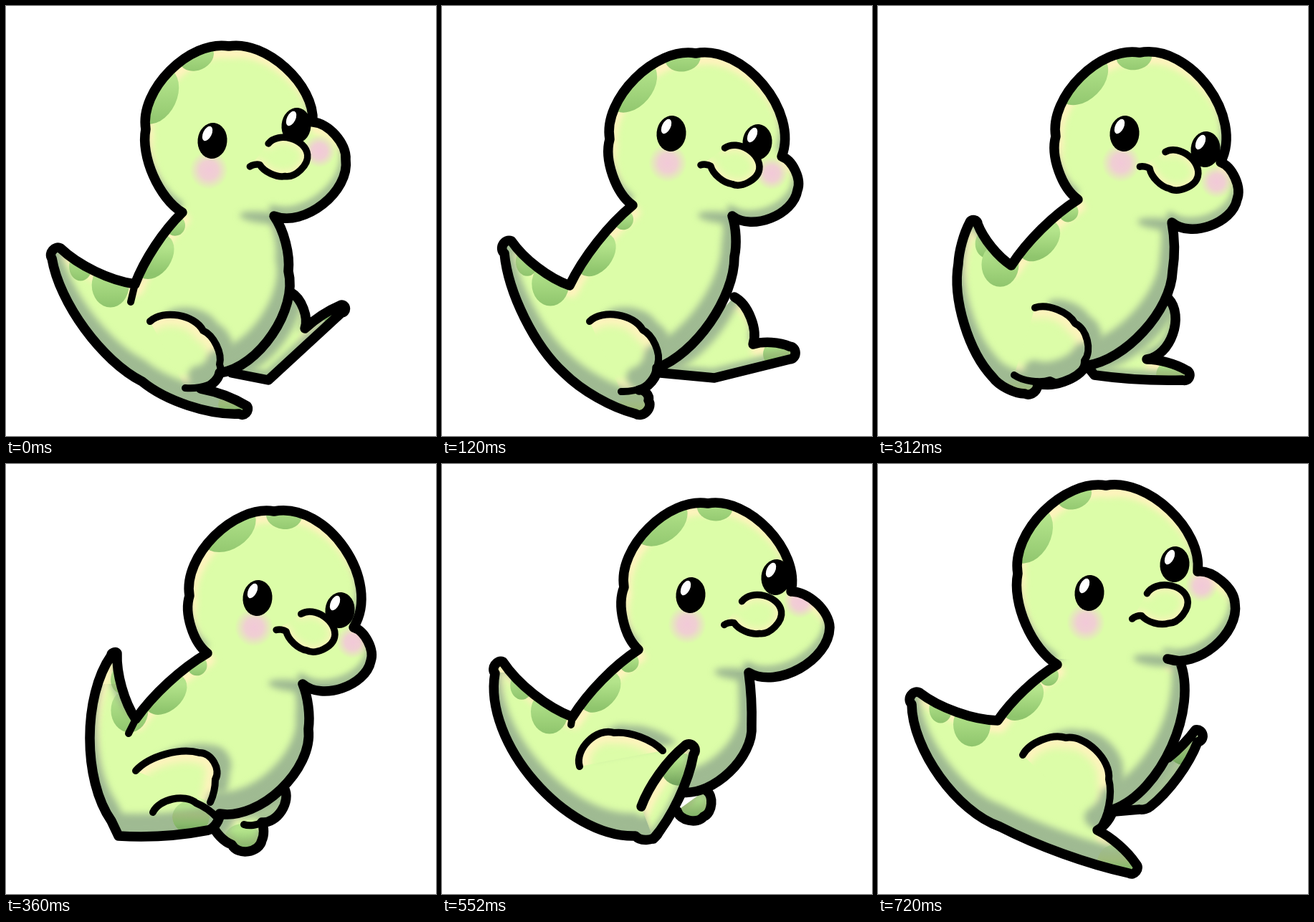
Write an HTML page with a canvas that moves like this. It is 600 px wide and 600 px high and loops after 840 ms.

```html
<!DOCTYPE html>
<html lang="en">
<head>
<meta charset="utf-8">
<title>Little dinosaur</title>
<style>
html, body { margin: 0; width: 100%; height: 100%; overflow: hidden; background: #fff; }
canvas { display: block; }
</style>
</head>
<body>
<canvas width="600" height="600"></canvas>
<script>
const HOLD = 120;
const SKIN = '#dcfda8', CREAM = '#fff3bd', SHADE = '#9fba92';
const NOSE = '-20,-24 .27 31,1 .2 -5,25 .13 -37,3 -.1 -51,3';
const ctx = document.querySelector('canvas').getContext('2d');

// Outlines run clockwise: "x,y bulge x,y ..." where a positive bulge swells outwards.
// head: centre and radius; turn: angle of the large head spot; front: throat to tail tip.
const poses = [
  {
    head: [311, 172, 116], turn: -155, nape: [246, 288], brow: [428, 162], snout: [474, 214], throat: [374, 293],
    eyes: [[288, 188], [405, 167]], nose: [390, 212], tip: [76, 338], base: [180, 388],
    front: '.08 394,370 .18 298,512 .15 272,534 .04 336,558 .4 325,569 .08 190,524 .1 64,352 .35',
    thigh: '201,440 .2 275,453 .15 298,500 .2 282,529 .05 250,533', toe: [322, 556],
    far: '398,400 .15 417,450 .04 468,417 .5 468,428 0 366,522 0 315,512', farToe: [464, 424],
    lines: ['180,388 0 174,413']
  },
  {
    head: [354, 186, 120], turn: -140, nape: [266, 278], brow: [474, 210], snout: [496, 257], throat: [405, 293],
    eyes: [[320, 178], [440, 190]], nose: [412, 224], tip: [97, 328], base: [178, 390],
    front: '.06 408,350 .13 300,505 .15 275,536 .25 288,550 .35 270,569 .06 170,512 .08 87,345 .4',
    thigh: '206,440 .2 280,452 .15 301,500 .2 282,532 .05 250,538', toe: [270, 563],
    far: '408,406 .15 434,472 .08 485,475 .45 485,493 0 380,519 0 305,512', farToe: [474, 486],
    lines: []
  },
  {
    head: [365, 182, 117], turn: -135, nape: [279, 270], brow: [478, 218], snout: [501, 270], throat: [410, 302],
    eyes: [[344, 178], [457, 200]], nose: [416, 231], tip: [139, 304], base: [186, 362],
    front: '.04 411,370 .15 290,502 .15 222,526 .3 205,541 .1 160,518 .1 112,360 .05 128,302 .4',
    thigh: '219,421 .15 275,443 .2 288,495 .25 240,522 .1 190,515', toe: [202, 538],
    far: '405,408 .25 375,493 .06 430,508 .5 425,522 .02 302,515 0 290,500', farToe: [414, 515],
    lines: []
  },
  {
    head: [374, 184, 118], turn: -124, nape: [281, 264], brow: [485, 228], snout: [509, 275], throat: [414, 307],
    eyes: [[351, 187], [466, 204]], nose: [428, 236], tip: [155, 264], base: [181, 356],
    front: '.06 422,370 .2 298,488 .15 282,511 .03 157,519 0 147,498 .13 147,267 .3',
    thigh: '181,428 .12 270,403 .25 292,440 .05 285,472', toe: [258, 493],
    far: '388,452 .25 357,500 .1 357,525 .3 315,531 .1 288,503', farToe: [330, 525],
    lines: ['181,356 0 171,376', '205,486 .2 265,473 .05 294,493', '357,500 .1 332,503']
  },
  {
    head: [371, 172, 117], turn: -126, nape: [274, 259], brow: [487, 178], snout: [541, 228], throat: [428, 291],
    eyes: [[347, 183], [466, 158]], nose: [443, 211], tip: [85, 276], base: [182, 353],
    front: '.02 432,365 .19 335,458 0 300,518 .2 270,519 .19 74,292 .35',
    thigh: '192,422 .25 240,375 .1 308,400',
    far: '368,455 .25 365,492 .25 328,484', farToe: [350, 478],
    foot: '278,478 .06 338,394 .5 351,405 .06 295,523', footToe: [332, 426],
    lines: ['182,353 0 180,364']
  },
  {
    head: [330, 160, 117], turn: -138, nape: [257, 277], brow: [446, 148], snout: [501, 207], throat: [411, 280],
    eyes: [[295, 180], [413, 140]], nose: [395, 196], tip: [68, 292], base: [180, 355],
    front: '.13 385,437 0 402,443 .3 400,482 .03 250,530 0 215,514 .17 57,305 .35',
    thigh: '197,422 .2 262,377 .16 346,445', toe: [384, 466],
    lines: ['330,461 .15 385,438']
  },
  {
    head: [318, 153, 123], turn: -153, nape: [250, 280], brow: [446, 150], snout: [498, 194], throat: [404, 272],
    eyes: [[295, 180], [414, 140]], nose: [402, 197], tip: [58, 319], base: [167, 358],
    front: '0 421,275 .17 328,482 .1 306,511 .06 360,558 .4 350,571 .03 170,506 .13 47,335 .4',
    thigh: '202,406 .15 262,382 .2 322,440 .1 308,510', toe: [332, 554],
    far: '405,410 -.03 443,371 .5 446,388 .06 380,478 .1 365,482 0 330,485', farToe: [430, 398],
    lines: []
  }
];

const rad = degrees => degrees * Math.PI / 180;
const mix = (a, b, t, drop = 0) => [a[0] + (b[0] - a[0]) * t, a[1] + (b[1] - a[1]) * t + drop];
const polar = (x, y, r, angle) => [x + r * Math.cos(angle), y + r * Math.sin(angle)];
const heading = (a, b) => Math.atan2(b[1] - a[1], b[0] - a[0]);

function curve(text) {
  const path = new Path2D();
  const tokens = text.trim().split(/\s+/);
  let [x, y] = tokens[0].split(',').map(Number);
  path.moveTo(x, y);
  for (let i = 1; i < tokens.length; i += 2) {
    const bulge = +tokens[i], [X, Y] = tokens[i + 1].split(',').map(Number);
    const dx = X - x, dy = Y - y;
    const along = (1 - 2 * Math.abs(bulge)) / 3, out = bulge * 4 / 3;
    path.bezierCurveTo(
      x + dx * along + dy * out, y + dy * along - dx * out,
      X - dx * along + dy * out, Y - dy * along - dx * out, X, Y);
    [x, y] = [X, Y];
  }
  return path;
}

function bodyCurve({ head: [x, y, r], nape, brow, snout, throat, front, tip, base }) {
  const forehead = Math.tan((Math.PI / 2 + heading([x, y], brow)) / 4) / 2;
  return curve(`${nape} .13 ${x - r},${y} .207 ${x},${y - r} ${forehead} ${brow}
    .17 ${snout} .23 ${throat} ${front} ${tip} -.07 ${base} .05 ${nape}`);
}

function scoped(draw) {
  ctx.save();
  draw();
  ctx.restore();
}

function oval([x, y], rx, ry, angle, fill) {
  ctx.fillStyle = fill;
  ctx.beginPath();
  ctx.ellipse(x, y, rx, ry, angle, 0, 2 * Math.PI);
  ctx.fill();
}

function ink(path, width) {
  ctx.strokeStyle = '#000';
  ctx.lineWidth = width;
  ctx.lineCap = ctx.lineJoin = 'round';
  ctx.stroke(path);
}

// Soft band inside the edges of a shape, moved by (dx, dy).
function rim(path, dx, dy, width, color) {
  const outside = new Path2D();
  outside.rect(-300, -300, 1200, 1200);
  outside.addPath(path);
  scoped(() => {
    ctx.filter = 'blur(5px)';
    ctx.translate(dx, dy);
    ctx.fillStyle = ctx.strokeStyle = color;
    ctx.lineWidth = width;
    ctx.fill(outside, 'evenodd');
    ctx.stroke(path);
  });
}

function castShadow(path, dx, dy) {
  scoped(() => {
    ctx.filter = 'blur(5px)';
    ctx.translate(dx, dy);
    ctx.fillStyle = SHADE;
    ctx.fill(path);
  });
}

function fold(path, glow) {
  scoped(() => {
    ctx.clip(path);
    ctx.fillStyle = SKIN;
    ctx.fill(path);
    ctx.filter = 'blur(6px)';
    ctx.strokeStyle = CREAM;
    ctx.lineWidth = glow;
    ctx.stroke(path);
  });
}

function spot([x, y], rx, ry, angle = 0, dark = '#8fc56d') {
  const fill = ctx.createLinearGradient(x, y - ry, x, y + ry);
  fill.addColorStop(0.2, '#b4e48b');
  fill.addColorStop(1, dark);
  oval([x, y], rx, ry, angle, fill);
}

function toeSpot(at) {
  if (at) spot(at, 26, 23, 0, '#6fa05a');
}

function bodySpots({ head: [x, y, r], turn, nape, tip, base }) {
  const side = rad(turn), crown = rad(turn + 41), back = heading(base, nape);
  spot(polar(x, y, r - 4, side), 29, 42, side);
  spot(polar(x, y, r - 5, crown), 19, 25, crown);
  spot(mix(base, nape, 0.42, 4), 34, 23, back);
  spot(mix(base, nape, 0.86, 5), 14, 13, back);
  spot(mix(tip, base, 0.27, 12), 16, 20);
  spot(mix(tip, base, 0.67, 18), 26, 31);
}

function cheek([x, y], radius) {
  const fill = ctx.createRadialGradient(x, y, 0, x, y, radius);
  fill.addColorStop(0, '#f2c9d8');
  fill.addColorStop(0.45, '#f2c9d8e0');
  fill.addColorStop(1, '#f2c9d800');
  oval([x, y], radius, radius, 0, fill);
}

function part(path, detail, shadeAll) {
  scoped(() => {
    ctx.clip(path);
    ctx.fillStyle = SKIN;
    ctx.fill(path);
    rim(path, 4, 10, 14, CREAM);
    detail();
    ctx.globalCompositeOperation = 'darken';
    shadeAll();
  });
  ink(path, 13.5);
}

function drawFace({ eyes: [left, right], nose }) {
  const tilt = heading(left, right);
  for (const [x, y] of [left, right]) {
    oval([x, y], 20.5, 25, 0.1, '#000');
    oval([x - 7, y - 10], 6, 11, 0.45, '#fff');
  }
  scoped(() => {
    ctx.translate(...nose);
    ctx.rotate(tilt);
    const path = curve(NOSE);
    fold(path, 14);
    ink(path, 9.5);
  });
}

function drawPose(pose) {
  ctx.fillStyle = '#fff';
  ctx.fillRect(0, 0, 600, 600);
  const body = bodyCurve(pose), thigh = curve(pose.thigh);
  const [left, right] = pose.eyes, tilt = heading(left, right);

  if (pose.far) {
    const far = curve(pose.far);
    part(far, () => toeSpot(pose.farToe), () => {
      castShadow(body, 20, 6);
      rim(far, -2, -8, 8, SHADE);
    });
  }

  part(body, () => {
    scoped(() => {
      ctx.globalCompositeOperation = 'darken';
      castShadow(thigh, 20, -10);
      ctx.filter = 'blur(5px)';
      oval([pose.throat[0] - 16, pose.throat[1] + 2], 32, 8, 0.1, SHADE);
    });
    fold(thigh, 30);
    cheek([left[0] - 5, left[1] + 41], 27);
    cheek(polar(...right, 48, rad(59) + tilt * 1.1), 23);
    bodySpots(pose);
    toeSpot(pose.toe);
  }, () => {
    rim(body, -3, -11, 8, SHADE);
    ctx.beginPath();
    ctx.rect(0, pose.throat[1], 600, 600);
    ctx.clip();
    rim(body, -4, -18, 28, SHADE);
  });
  ink(thigh, 10);

  if (pose.foot) {
    const foot = curve(pose.foot);
    part(foot, () => toeSpot(pose.footToe), () => rim(foot, -3, -6, 6, SHADE));
  }
  pose.lines.forEach(line => ink(curve(line), 10));
  drawFace(pose);
}

let shown = -1;
function tick(now) {
  const index = Math.floor(now / HOLD) % poses.length;
  if (index !== shown) drawPose(poses[shown = index]);
  requestAnimationFrame(tick);
}
tick(performance.now());
</script>
</body>
</html>
```
